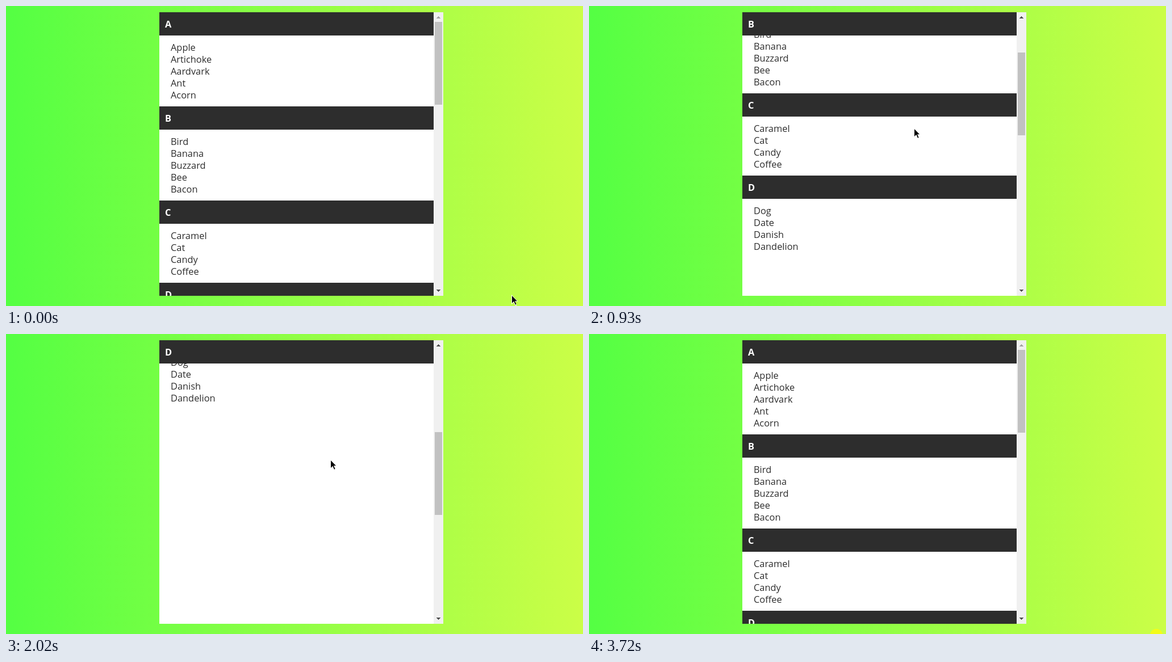
Recreate the animation shown at these times as an HTML page. Size 1016 by 529 pixels, loop 3.79 s.

```html
<!DOCTYPE html>
<html lang="en">
<head>
<meta charset="utf-8">
<title>Sticky headers</title>
<style>
  html, body { margin: 0; width: 100%; height: 100%; overflow: hidden; }
  svg { display: block; width: 100vw; height: 100vh; }
  text { font: 16.4px "Open Sans", "Noto Sans", sans-serif; fill: #2d2d2d; }
  .head text { font-weight: 700; fill: #fff; }
  .arrow { fill: #505050; shape-rendering: crispEdges; }
</style>
</head>
<body>
<svg viewBox="0 0 1016 529">
  <defs>
    <linearGradient id="lime">
      <stop offset="0" stop-color="#54ff43"/>
      <stop offset="1" stop-color="#cbfe47"/>
    </linearGradient>
    <clipPath id="view"><rect width="483" height="500"/></clipPath>
  </defs>
  <rect width="1016" height="529" fill="url(#lime)"/>
  <g transform="translate(270 11)">
    <rect width="500" height="500" fill="#fff"/>
    <g clip-path="url(#view)">
      <g id="items"></g>
      <g id="heads"></g>
    </g>
    <rect x="483" width="17" height="500" fill="#f0f0f0"/>
    <path id="up" class="arrow" d="M487.5 11L491.5 7L495.5 11Z"/>
    <path class="arrow" d="M487.5 489L491.5 493L495.5 489Z"/>
    <rect id="thumb" x="485" width="13" height="146" fill="#c1c1c1"/>
  </g>
  <circle id="spot" cx="999" cy="531.2" r="11.2" fill="#f2fc1a"/>
  <g id="cursor">
    <path d="M0 0V17L4 13.6L6.4 19H9.4L6.9 12H11.5Z" fill="#fff"/>
    <path d="M1 2V15L4.3 11.8L6.9 17.8L8.6 17.1L6 11.2H10Z"/>
  </g>
</svg>
<script>
const LOOP = 3790, FRAME = 77.5, HEAD = 41, LINE = 21, PAD = 10;
const $ = id => document.getElementById(id);

const groups = {
  A: ['Apple', 'Artichoke', 'Aardvark', 'Ant', 'Acorn'],
  B: ['Bird', 'Banana', 'Buzzard', 'Bee', 'Bacon'],
  C: ['Caramel', 'Cat', 'Candy', 'Coffee'],
  D: ['Dog', 'Date', 'Danish', 'Dandelion']
};

const NOTCH = 100, NOTCH_TIME = 2.5;
const notchesDown = [5.75, 10.02, 13.4, 17.37, 22.95];
const notchesUp = notchesDown.map((_, i) => 29.8 + 0.875 * i);

const home = { x: 890, y: 509 };
const glides = [
  { start: 0, time: 3, dx: -318, dy: -294 },
  { start: 25, time: 1, dx: -1, dy: 6 },
  { start: 39, time: 7, dx: 435, dy: 315 }
];

function ease(now, start, time) {
  const p = Math.min(Math.max((now - start) / time, 0), 1);
  return p * p * (3 - 2 * p);
}

const sum = (list, fn) => list.reduce((total, item) => total + fn(item), 0);
const notches = (starts, now) => NOTCH * sum(starts, s => ease(now, s, NOTCH_TIME));
const glide = (axis, now) => sum(glides, g => g[axis] * ease(now, g.start, g.time));
const move = (node, x, y) => node.setAttribute('transform', `translate(${x} ${y})`);

function add(parent, tag, attrs, content = '') {
  const node = document.createElementNS('http://www.w3.org/2000/svg', tag);
  for (const name in attrs) node.setAttribute(name, attrs[name]);
  node.textContent = content;
  return parent.appendChild(node);
}

let bottom = 0;
const sections = Object.entries(groups).map(([letter, words]) => {
  const top = bottom;
  bottom += HEAD + 2 * PAD + LINE * words.length;
  words.forEach((word, i) =>
    add($('items'), 'text', { x: 20, y: top + HEAD + PAD + 17 + LINE * i }, word));
  const head = add($('heads'), 'g', { class: 'head' });
  add(head, 'rect', { width: 483, height: HEAD, fill: '#2d2d2d' });
  add(head, 'text', { x: 10, y: 27 }, letter);
  return { head, top, end: bottom };
});

function draw(t) {
  const now = Math.floor((t + 13) / FRAME);
  const scroll = Math.round(notches(notchesDown, now) - notches(notchesUp, now));
  move($('items'), 0, -scroll);
  for (const { head, top, end } of sections)
    move(head, 0, Math.min(Math.max(top - scroll, 0), end - HEAD - scroll));
  $('thumb').setAttribute('y', 17 + Math.floor(scroll * 0.29));
  $('up').style.fill = scroll ? '' : '#a3a3a3';
  move($('cursor'), Math.round(home.x + glide('dx', now)), Math.round(home.y + glide('dy', now)));
  $('spot').setAttribute('opacity', ease(now, 46, 2));
}

const start = performance.now();
function tick() {
  draw((performance.now() - start) % LOOP);
  requestAnimationFrame(tick);
}
tick();
</script>
</body>
</html>
```
